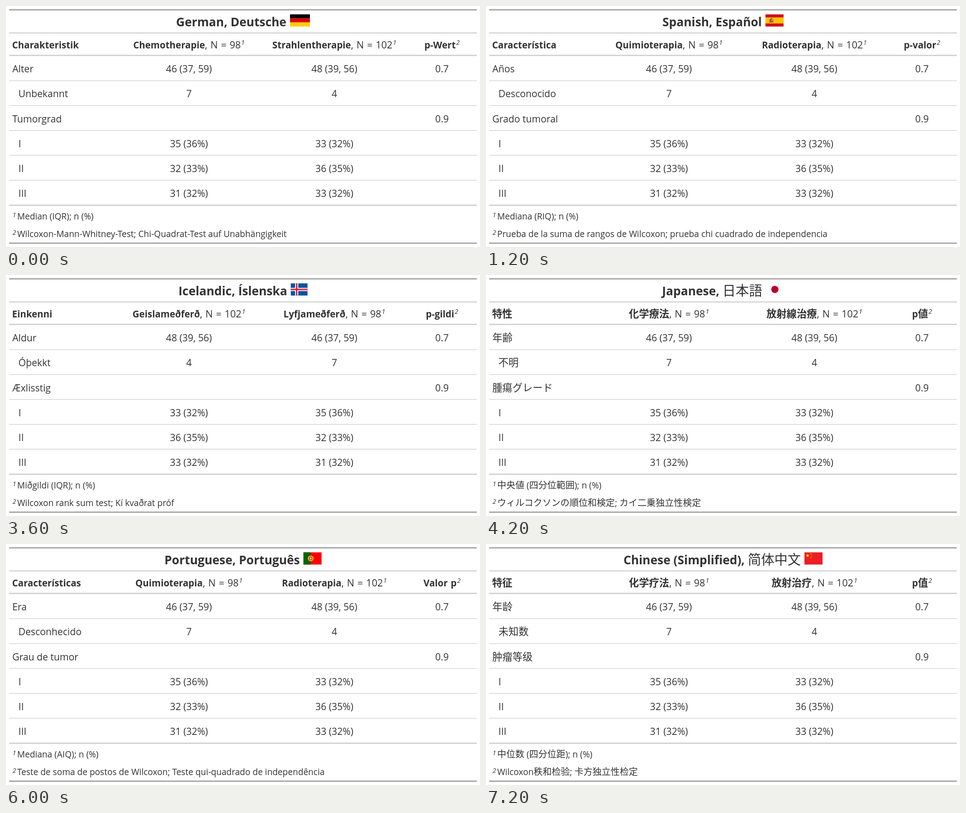
An HTML page that plays this animation: 1048x534 px, repeating every 7800 ms.

```html
<!DOCTYPE html>
<html lang="en">
<head>
<meta charset="utf-8">
<title>Summary table in many languages</title>
<style>
  html, body { margin: 0; width: 100%; height: 100%; overflow: hidden; background: #fff; }
  svg { display: block; }
  text { fill: #333; font: 21.2px "Open Sans", "Noto Sans", sans-serif; }
  .mid { text-anchor: middle; }
  .title { font-size: 26.4px; font-weight: 700; }
  .head { font-size: 21.6px; word-spacing: 1.3px; }
  .head .b { font-size: 20.5px; font-weight: 700; }
  .foot { font-size: 19.1px; }
  .sup { font-size: 14px; font-weight: 400; font-style: italic; }
  /* Each script keeps its own scale (--k) and heading weight (--w). */
  .page { --k: 1; --w: 600; }
  .page[lang="gu"] { --k: .95; --w: 500; }
  .page[lang="hi"], .page[lang="mr"] { --k: 1.05; --w: 500; }
  .x { font-family: "Noto Sans", "Noto Sans Devanagari", "Noto Sans Gujarati", "Noto Sans CJK SC", sans-serif; font-size: calc(var(--k) * 1.05em); }
  .title .x { font-size: calc(var(--k) * 1.11em); font-weight: 500; }
  .head .x { font-size: calc(var(--k) * 1.09em); font-weight: var(--w); }
</style>
</head>
<body>
<svg id="stage" width="1048" height="534" viewBox="0 0 1048 534"></svg>
<script>
const STEP = 600;
const COLS = [404.5, 726, 964];
const ROWS = [147, 202, 257.5, 312.5, 367.5, 422.5];
const CHEMO = ['98', '46 (37, 59)', '7', '', '35 (36%)', '32 (33%)', '31 (32%)'];
const RADIO = ['102', '48 (39, 56)', '4', '', '33 (32%)', '36 (35%)', '33 (32%)'];

// Flags are drawn in a box 40 wide and 27 high.
const rect = (x, y, w, h, fill) => `<rect x="${x}" y="${y}" width="${w}" height="${h}" fill="${fill}"/>`;
const dot = (x, y, r, fill) => `<circle cx="${x}" cy="${y}" r="${r}" fill="${fill}"/>`;
const bands = (colors, w = 40) => colors.map((c, i) => rect(0, i * 27 / colors.length, w, 27 / colors.length, c)).join('');
const cross = (base, arms, w) => rect(0, 0, w, 27, base) +
  arms.map(([c, t]) => rect(13 - t / 2, 0, t, 27, c) + rect(0, 13.5 - t / 2, w, t, c)).join('');
const star = (x, y, r) => {
  const pts = Array.from({ length: 10 }, (_, i) => {
    const a = i * Math.PI / 5, q = i % 2 ? r * 0.4 : r;
    return `${(x + q * Math.sin(a)).toFixed(2)},${(y - q * Math.cos(a)).toFixed(2)}`;
  });
  return `<polygon points="${pts.join(' ')}" fill="#ffde00"/>`;
};
const trigram = (x, y, angle, broken) => `<g transform="translate(${x} ${y}) rotate(${angle})">` +
  [0, 1, 2].map(i => rect(-3.5, i * 2 - 2.6, 7, 1.2, '#111') +
    (broken >> i & 1 ? rect(-0.4, i * 2 - 2.6, 0.8, 1.2, '#fff') : '')).join('') + '</g>';

const FLAGS = {
  de: bands(['#000', '#d00', '#ffce00'], 44),
  us: rect(0, 0, 40, 27, '#fff') +
    Array.from({ length: 7 }, (_, i) => rect(0, i * 54 / 13, 40, 27 / 13, '#b22234')).join('') +
    rect(0, 0, 18, 14.5, '#3c3b6e') +
    Array.from({ length: 20 }, (_, i) => dot(2 + i % 5 * 3.5, 2 + (i / 5 | 0) * 3.5, 0.7, '#fff')).join(''),
  es: rect(0, 0, 40, 27, '#cf1020') + rect(0, 6.8, 40, 13.4, '#ffc400') +
    rect(9.5, 10.5, 7, 7.5, '#b5452c') + rect(11, 8.5, 4, 2, '#a5651c') +
    rect(8, 11, 1, 7, '#a88a70') + rect(17, 11, 1, 7, '#a88a70') + rect(13, 11.5, 2.5, 2.5, '#d8b8a8'),
  fr: rect(0, 0, 14, 27, '#002395') + rect(13.4, 0, 13.3, 27, '#fff') + rect(26.7, 0, 13.3, 27, '#ed2939'),
  in: bands(['#f93', '#fff', '#138808']) +
    '<circle cx="20" cy="13.5" r="3.4" fill="#e8e8f8" stroke="#22228c" stroke-width=".9"/>' + dot(20, 13.5, 1.1, '#22228c'),
  is: cross('#0b52a0', [['#fff', 7], ['#dc1e35', 3.2]], 37),
  jp: rect(0, 0, 40, 27, '#fff') + dot(20, 13.5, 8, '#bc002d'),
  kr: rect(0, 0, 40, 27, '#fff') + '<g transform="rotate(30 20 13.5)">' + dot(20, 13.5, 6.8, '#0047a0') +
    '<path d="M13.2 13.5a6.8 6.8 0 0 1 13.6 0a3.4 3.4 0 0 1-6.8 0a3.4 3.4 0 0 0-6.8 0" fill="#cd2e3a"/></g>' +
    trigram(8.5, 6, -56, 0) + trigram(31.5, 6, 56, 5) + trigram(8.5, 21, 56, 2) + trigram(31.5, 21, -56, 7),
  pt: rect(0, 0, 40, 27, '#f00') + rect(0, 0, 16, 27, '#060') +
    dot(16, 13.5, 6.2, '#ffe000') + dot(16, 13.5, 4.8, '#c9a800') +
    rect(12.8, 9.8, 6.4, 7.2, '#e0001b') + rect(14.2, 11.2, 3.6, 4.4, '#fff') + rect(15.4, 12.4, 1.2, 1.8, '#039'),
  se: cross('#006aa7', [['#fecc00', 5.4]], 40),
  cn: rect(0, 0, 40, 27, '#ee1c25') + star(7, 7.2, 4.4) +
    [[13.5, 2.8], [16, 5.6], [16, 9.4], [13.5, 12.2]].map(p => star(...p, 1.5)).join('')
};

// lang, flag, title, heading, chemotherapy, radiation, p-value, age, unknown, grade, two notes, radiation first
const PAGES = [
  ['de', 'de', 'German, Deutsche', 'Charakteristik', 'Chemotherapie', 'Strahlentherapie', 'p-Wert',
    'Alter', 'Unbekannt', 'Tumorgrad', 'Median (IQR); n (%)',
    'Wilcoxon-Mann-Whitney-Test; Chi-Quadrat-Test auf Unabhängigkeit'],
  ['en', 'us', 'English', 'Characteristic', 'Chemotherapy', 'Radiation Therapy', 'p-value',
    'Age', 'Unknown', 'Tumor Grade', 'Median (IQR); n (%)',
    "Wilcoxon rank sum test; Pearson's Chi-squared test"],
  ['es', 'es', 'Spanish, Español', 'Característica', 'Quimioterapia', 'Radioterapia', 'p-valor',
    'Años', 'Desconocido', 'Grado tumoral', 'Mediana (RIQ); n (%)',
    'Prueba de la suma de rangos de Wilcoxon; prueba chi cuadrado de independencia'],
  ['fr', 'fr', 'French, Français', 'Caractéristique', 'Chimiothérapie', 'Radiothérapie', 'p-valeur',
    'Âge', 'Inconnu', 'Grade de la tumeur', 'Médiane (EI); n (%)',
    "test de Wilcoxon-Mann-Whitney; test du khi-deux d'indépendance"],
  ['gu', 'in', 'Gujarati, ગુર્જરતી', 'લાક્ષણિકતાઓ', 'કીમોથેરાપી', 'રેડિયેશન થેરપી', 'પી-મૂલ્ય',
    'ઉંમર', 'અજાણ્યું', 'ગાંઠ ગ્રેડ', 'મધ્યમાં આવેલું (આઇ ક્યૂ આર); n (%)',
    'વિલ્કોક્સન ક્રમ-સરવાળો પરીક્ષણ; સ્વતંત્રતાનો ચી-ચોરસ પરીક્ષણ'],
  ['hi', 'in', 'Hindi, हिन्दी', 'विशेषताएँ', 'कीमोथेरेपी', 'विकिरण चिकित्सा', 'पी वैल्यू',
    'आयु', 'अज्ञात', 'ट्यूमर ग्रेड', 'माध्यिका (आई क्यू आर); n (%)',
    'विलकॉक्सन रैंक-योग परीक्षण; स्वतंत्रता का काई-वर्ग परीक्षण'],
  ['is', 'is', 'Icelandic, Íslenska', 'Einkenni', 'Lyfjameðferð', 'Geislameðferð', 'p-gildi',
    'Aldur', 'Óþekkt', 'Æxlisstig', 'Miðgildi (IQR); n (%)',
    'Wilcoxon rank sum test; Kí kvaðrat próf', true],
  ['ja', 'jp', 'Japanese, 日本語', '特性', '化学療法', '放射線治療', 'p値',
    '年齢', '不明', '腫瘍グレード', '中央値 (四分位範囲); n (%)',
    'ウィルコクソンの順位和検定; カイ二乗独立性検定'],
  ['ko', 'kr', 'Korean, 한국어', '특성', '화학요법', '방사선 요법', 'p 값',
    '나이', '알 수 없음', '종양 등급', '중앙값 (사분위수 범위); n (%)',
    '윌콕슨 순위합 검정; 카이제곱 독립성 검정', true],
  ['mr', 'in', 'Marathi, मराठी', 'वैशिष्ट्ये', 'केमोथेरपी', 'रेडिएशन थेरपी', 'पी-मूल्य',
    'वय', 'अज्ञात', 'ट्यूमर ग्रेड', 'मध्यम (आई क्यू आर); n (%)',
    'विल्कोक्सन रँक-बेरीज परीक्षा; स्वातंत्र्याची चि-स्क्वेअर परीक्षा'],
  ['pt', 'pt', 'Portuguese, Português', 'Características', 'Quimioterapia', 'Radioterapia', 'Valor p',
    'Era', 'Desconhecido', 'Grau de tumor', 'Mediana (AIQ); n (%)',
    'Teste de soma de postos de Wilcoxon; Teste qui-quadrado de independência'],
  ['sv', 'se', 'Swedish, Svenska', 'Karaktäristik', 'Kemoterapi', 'Strålbehandling', 'p-värde',
    'Ålder', 'Okänd', 'Tumörgrad', 'Median (IQR); n (%)',
    'Wilcoxon-Mann-Whitney-test; Chi-två-test av oberoende'],
  ['zh-CN', 'cn', 'Chinese (Simplified), 简体中文', '特征', '化学疗法', '放射治疗', 'p值',
    '年龄', '未知数', '肿瘤等级', '中位数 (四分位距); n (%)',
    'Wilcoxon秩和检验; 卡方独立性检定']
];

// Wraps runs of other scripts so they take their own font and size.
const mixed = s => s.replace(/[^\u0000-\u024f]+/g, run => `<tspan class="x">${run}</tspan>`);
const text = (x, y, body, cls = '') => `<text x="${x}" y="${y}" class="${cls}">${body}</text>`;
const bold = s => `<tspan class="b">${mixed(s)}</tspan>`;
const sup = n => `<tspan class="sup" dx="1" dy="-8">${n}</tspan>`;
const line = (y, h, color) => rect(7, y, 1034, h, color);

function page([lang, flag, title, heading, chemo, radio, p, age, unknown, grade, note1, note2, swap]) {
  const arms = [[chemo, CHEMO], [radio, RADIO]];
  if (swap) arms.reverse();
  const labels = [age, unknown, grade, 'I', 'II', 'III'];
  let out = text(524, 45, mixed(title), 'title mid') + `<g class="flag">${FLAGS[flag]}</g>`;
  out += text(13.5, 94, bold(heading), 'head');
  arms.forEach(([name, data], c) => {
    out += text(COLS[c], 94, `${bold(name)}, N = ${data[0]}${sup(1)}`, 'head mid');
    ROWS.forEach((y, r) => { out += text(COLS[c], y, data[r + 1], 'mid'); });
  });
  out += text(COLS[2], 94, bold(p) + sup(2), 'head mid');
  out += text(COLS[2], ROWS[0], '0.7', 'mid') + text(COLS[2], ROWS[2], '0.9', 'mid');
  labels.forEach((s, r) => { out += text(r % 2 || r > 2 ? 27.5 : 14, ROWS[r], mixed(s)); });
  [note1, note2].forEach((s, i) => {
    const y = 472.5 + i * 39;
    out += text(14.5, y - 5, i + 1, 'sup') + text(24.7, y, mixed(s), 'foot');
  });
  return `<g lang="${lang}" class="page" visibility="hidden">${out}</g>`;
}

const stage = document.getElementById('stage');
stage.innerHTML = line(7, 3, '#a8a8a8') + line(58.5, 2.5, '#d3d3d3') + line(108, 3, '#d3d3d3') +
  [164.7, 219.8, 275, 330.2, 385.3].map(y => line(y, 1.5, '#d3d3d3')).join('') +
  line(440, 3, '#d3d3d3') + line(524, 3, '#a8a8a8') + PAGES.map(page).join('');

// Centres each title together with its flag.
const pages = [...stage.querySelectorAll('.page')];
pages.forEach((g, i) => {
  const title = g.querySelector('.title');
  const flagWidth = { de: 44, is: 37 }[PAGES[i][1]] || 40;
  const extra = flagWidth + 8;
  const end = 524 + (title.getComputedTextLength() - extra) / 2;
  title.setAttribute('x', 524 - extra / 2);
  g.querySelector('.flag').setAttribute('transform', `translate(${end + 8} 18.5)`);
});

let shown = -1;
function tick() {
  const now = Math.floor(performance.now() / STEP) % pages.length;
  if (now !== shown) {
    pages.forEach((g, i) => g.setAttribute('visibility', i === now ? 'visible' : 'hidden'));
    shown = now;
  }
  requestAnimationFrame(tick);
}
tick();
</script>
</body>
</html>
```
